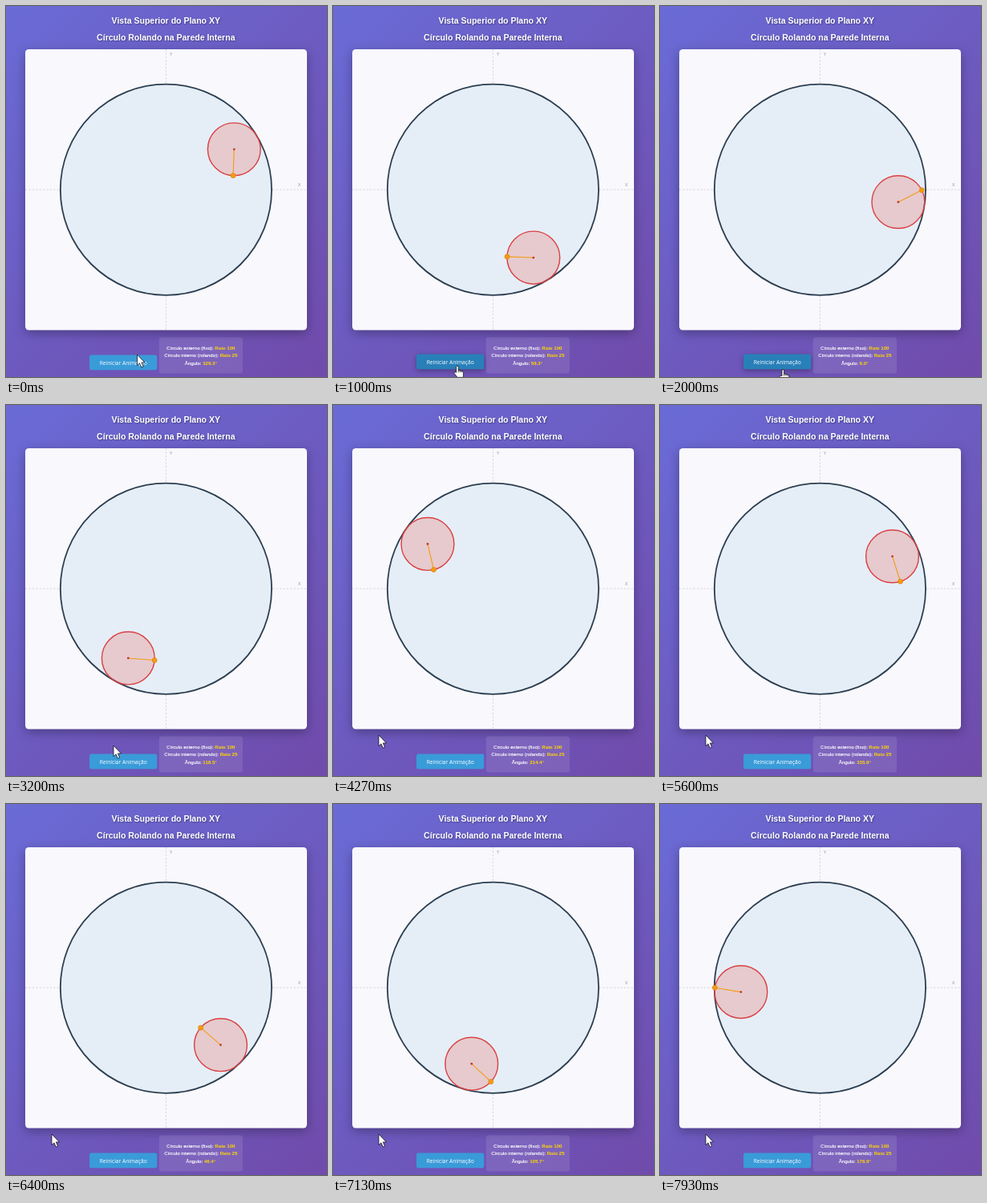
Recreate the animation shown at these times as an HTML page. Size 400 by 463 pixels, loop 8 s.

```html
<!DOCTYPE html>
<html lang="pt">
<head>
<meta charset="utf-8">
<title>Círculo Rolando na Parede Interna</title>
<style>
  html, body { margin: 0; width: 100%; height: 100%; overflow: hidden; }
  body { background: linear-gradient(135deg, #6a6bd6, #704bab); }
  svg { display: block; width: 100%; height: 100%; }
  text { text-anchor: middle; font-family: "Liberation Sans", Arial, sans-serif; fill: #fff; }
  .title { font-size: 10.53px; font-weight: bold; text-shadow: 1px 1px 2px rgba(0, 0, 0, .35); }
  .axis { font-size: 5.5px; fill: #999; }
  .info { font-size: 6.14px; stroke: #fff; stroke-width: .15; }
  .info tspan { font-weight: bold; fill: #ffd700; stroke: none; }
  .button { font: 6.65px "Open Sans", "Noto Sans", sans-serif; }
  #card { filter: drop-shadow(0 4px 6.5px rgba(0, 0, 0, .3)); }
</style>
</head>
<body>
<svg viewBox="0 0 400 463">
  <text class="title" x="199.3" y="21.6">Vista Superior do Plano XY</text>
  <text class="title" x="199.3" y="42.6">Círculo Rolando na Parede Interna</text>

  <rect id="card" x="24" y="54" width="351" height="350.5" rx="4.5" fill="#f9f8fd"/>
  <path d="M24 229.2H375M199.4 54V404.5" stroke="#ccc" stroke-width=".8" stroke-dasharray="2.2 2.2"/>
  <text class="axis" x="365.7" y="224.8">X</text>
  <text class="axis" x="205.7" y="62.2">Y</text>

  <circle cx="199.4" cy="229.2" r="131.6" fill="#e5eef7" stroke="#2c3e50" stroke-width="1.8"/>
  <circle id="roller" r="32.9" fill="#e74c3c" fill-opacity=".22" stroke="#db3f41" stroke-width="1.4"/>
  <line id="spoke" stroke="#f39c12" stroke-width="1.1"/>
  <circle id="hub" r="1.4" fill="#c0392b"/>
  <circle id="dot" r="3" fill="#f39c12" stroke="#e08012" stroke-width=".7"/>

  <g id="button">
    <rect x="104" y="435.5" width="84.2" height="18.7" rx="2.2"/>
    <text class="button" x="146.2" y="447.5">Reiniciar Animação</text>
  </g>

  <rect x="190.7" y="413.5" width="104.3" height="45" rx="3.5" fill="#fff" fill-opacity=".1"/>
  <text class="info" x="242.8" y="428.6">Círculo externo (fixo): <tspan>Raio 100</tspan></text>
  <text class="info" x="242.8" y="438.3">Círculo interno (rolando): <tspan>Raio 25</tspan></text>
  <text class="info" x="242.8" y="448">Ângulo: <tspan id="angle"></tspan></text>

  <g id="cursor" fill="#fff" stroke="#000" stroke-width=".7" stroke-linejoin="round">
    <path id="arrow" d="M0 0V13.6L3 10.8 5.3 16 7.6 15 5.4 9.9H9.4Z"/>
    <path id="hand" d="M-1.3 8V1.2a1.3 1.3 0 0 1 2.6 0V5.2l4.6 1q1.6.4 1.6 2V14H0L-4 8.8q0-1.8 1.5-1.2ZM1.3 5.2V8M3.5 5.8V8M5.6 6.3V8"/>
  </g>
</svg>
<script>
const LOOP = 8000, FPS = 15;
const CENTER = { x: 199.4, y: 229.2 }, ROLLER = 32.9, ORBIT = 98.7;

// Keys are [step, ...values]; the angle jumps to the start when the button is clicked.
const ANGLE = [[0, 329.3], [28, 497.3], [29, 3], [30, 9], [48, 118.5], [64, 214.4],
  [84, 335.9], [96, 406.4], [119, 542.8]];
const POINTER = [[0, 163.5, 435], [14, 155, 449], [28, 153.3, 453.8], [40, 153.3, 453.8],
  [47, 134, 425], [49, 134, 425], [60, 57, 412]];
const HOVER = [[2, 0], [6, 1], [43, 1], [47, 0]];

const $ = id => document.getElementById(id);
const set = (id, attrs) => {
  for (const name in attrs) $(id).setAttribute(name, attrs[name]);
};
const mix = (a, b, k) => a + (b - a) * k;
const polar = (from, radius, a) => ({ x: from.x + radius * Math.cos(a), y: from.y + radius * Math.sin(a) });

function sample(keys, step) {
  const next = keys.findIndex(key => key[0] > step);
  if (next < 0) return keys.at(-1).slice(1);
  if (next === 0) return keys[0].slice(1);
  const a = keys[next - 1], b = keys[next];
  const k = (step - a[0]) / (b[0] - a[0]);
  return a.slice(1).map((v, i) => mix(v, b[i + 1], k));
}

function draw(step) {
  const degrees = sample(ANGLE, step)[0] % 360;
  const a = degrees * Math.PI / 180;
  const hub = polar(CENTER, ORBIT, a);
  const dot = polar(hub, ROLLER, -3 * a); // rolling without slipping, radii 4 : 1
  set('roller', { cx: hub.x, cy: hub.y });
  set('hub', { cx: hub.x, cy: hub.y });
  set('dot', { cx: dot.x, cy: dot.y });
  set('spoke', { x1: hub.x, y1: hub.y, x2: dot.x, y2: dot.y });
  $('angle').textContent = degrees.toFixed(1) + '°';

  const [hover] = sample(HOVER, step);
  const color = [[58, 41], [155, 128], [217, 185]].map(([from, to]) => mix(from, to, hover));
  set('button', { fill: `rgb(${color})`, transform: `translate(0 ${-0.9 * hover})` });
  $('button').style.filter = hover ? `drop-shadow(0 2px 3px rgba(0,0,0,${0.3 * hover}))` : 'none';

  const [x, y] = sample(POINTER, step);
  const overButton = y > 435.5;
  set('cursor', { transform: `translate(${x} ${y})` });
  set('arrow', { visibility: overButton ? 'hidden' : 'visible' });
  set('hand', { visibility: overButton ? 'visible' : 'hidden' });
}

function tick() {
  const time = Math.floor(performance.now() % LOOP / 10) * 10;
  draw(Math.floor(time * FPS / 1000));
  requestAnimationFrame(tick);
}
tick();
</script>
</body>
</html>
```
